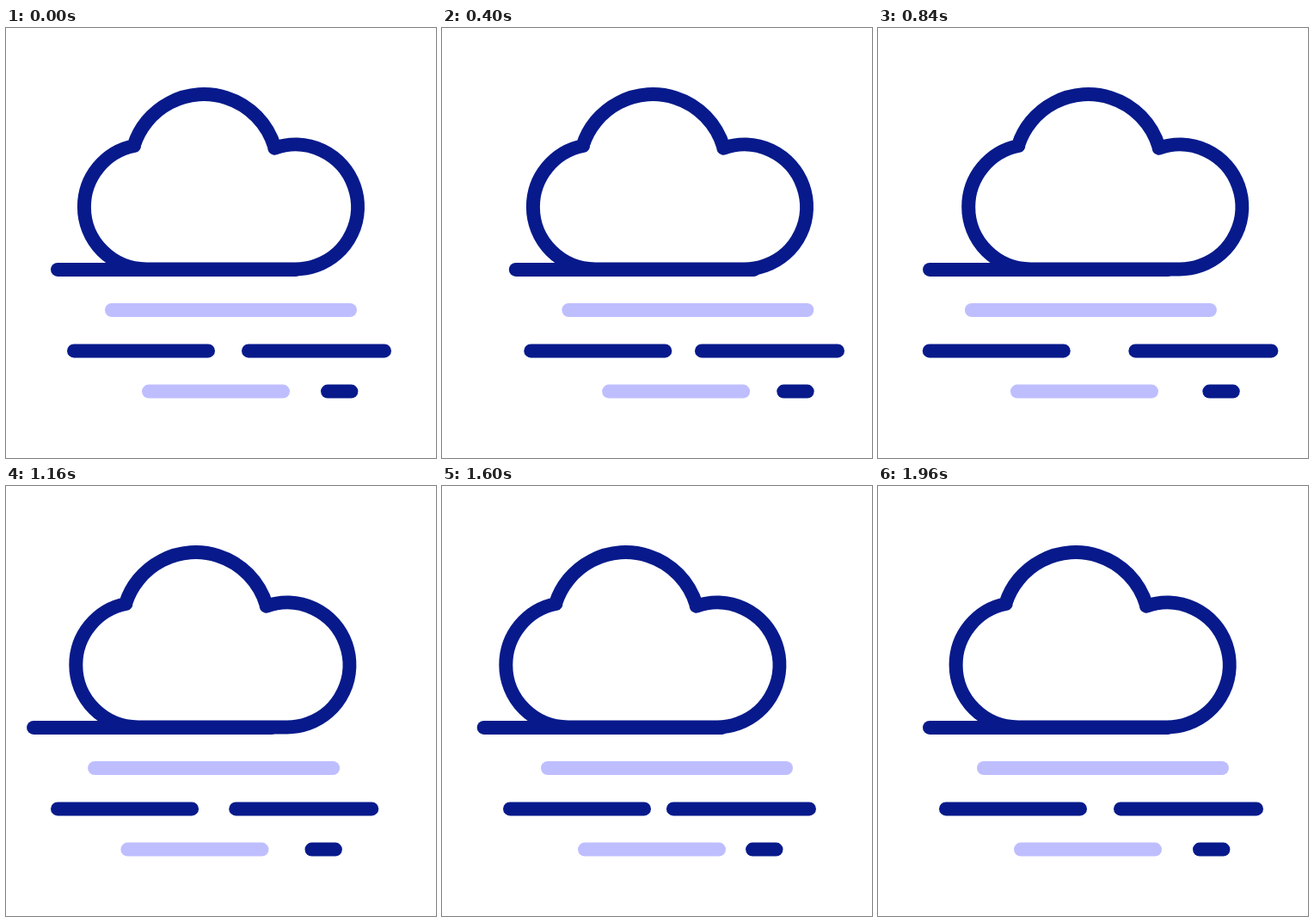
Write an HTML page with a canvas that moves like this. It is 500 px wide and 500 px high and loops after 2 s.

```html
<!DOCTYPE html>
<html lang="en">
<head>
<meta charset="utf-8">
<title>Windy cloud</title>
<style>
html, body { margin: 0; width: 100%; height: 100%; overflow: hidden; background: #fff; }
canvas { display: block; width: 500px; height: 500px; }
</style>
</head>
<body>
<canvas id="stage" width="500" height="500"></canvas>
<script>
const ctx = document.getElementById('stage').getContext('2d');
const LOOP = 2000, STEP = 40;
const NAVY = '#081a8b', LILAC = '#bebeff';

// sway: [right reach, left reach, time at right, time at left, time back home]
const cloudSway = [21.5, -21, 630, 1433, 2000];
const bars = [
  { x1: 60,  x2: 337,   y: 280.9, color: NAVY,  sway: [27, -30, 458, 1251, 1850] },
  { x1: 123, x2: 400,   y: 328,   color: LILAC, sway: [24.8, -24, 362, 1035, 1510] },
  { x1: 79,  x2: 235,   y: 375.4, color: NAVY,  sway: [27, -25, 307, 979, 1545] },
  { x1: 282, x2: 440,   y: 375.4, color: NAVY,  sway: [28.3, -24, 624, 1356, 1875] },
  { x1: 166, x2: 322,   y: 422.6, color: LILAC, sway: [33, -27, 528, 1067, 1570] },
  { x1: 374, x2: 401.4, y: 422.6, color: NAVY,  sway: [28.6, -23, 552, 1295, 1960] }
];

function ease(from, to, start, end, t) {
  const u = (t - start) / (end - start);
  return from + (to - from) * u * u * (3 - 2 * u);
}

function offset([right, left, t1, t2, t3], t) {
  if (t < t1) return ease(0, right, 0, t1, t);
  if (t < t2) return ease(right, left, t1, t2, t);
  if (t < t3) return ease(left, 0, t2, t3, t);
  return 0;
}

function arcBetween(cx, cy, r, from, to) {
  ctx.arc(cx, cy, r, Math.atan2(from[1] - cy, from[0] - cx), Math.atan2(to[1] - cy, to[0] - cx));
}

function drawCloud(dx) {
  const notchL = [149, 137], notchR = [312, 139];
  ctx.save();
  ctx.translate(dx, 0);
  ctx.strokeStyle = NAVY;
  ctx.beginPath();
  arcBetween(163.3, 208, 72.4, [163.3, 280.4], notchL);
  arcBetween(230.2, 162.7, 85.6, notchL, notchR);
  arcBetween(336.5, 208, 72.5, notchR, [336.5, 280.5]);
  ctx.closePath();
  ctx.stroke();
  ctx.restore();
}

function drawBar(bar, dx) {
  ctx.strokeStyle = bar.color;
  ctx.beginPath();
  ctx.moveTo(bar.x1 + dx, bar.y);
  ctx.lineTo(bar.x2 + dx, bar.y);
  ctx.stroke();
}

function draw(t) {
  ctx.fillStyle = '#fff';
  ctx.fillRect(0, 0, 500, 500);
  ctx.lineWidth = 16;
  ctx.lineCap = ctx.lineJoin = 'round';
  drawCloud(offset(cloudSway, t));
  for (const bar of bars) drawBar(bar, offset(bar.sway, t));
}

const began = performance.now();
function tick() {
  const t = (performance.now() - began) % LOOP;
  draw(Math.floor(t / STEP) * STEP);
  requestAnimationFrame(tick);
}
tick();
</script>
</body>
</html>
```
